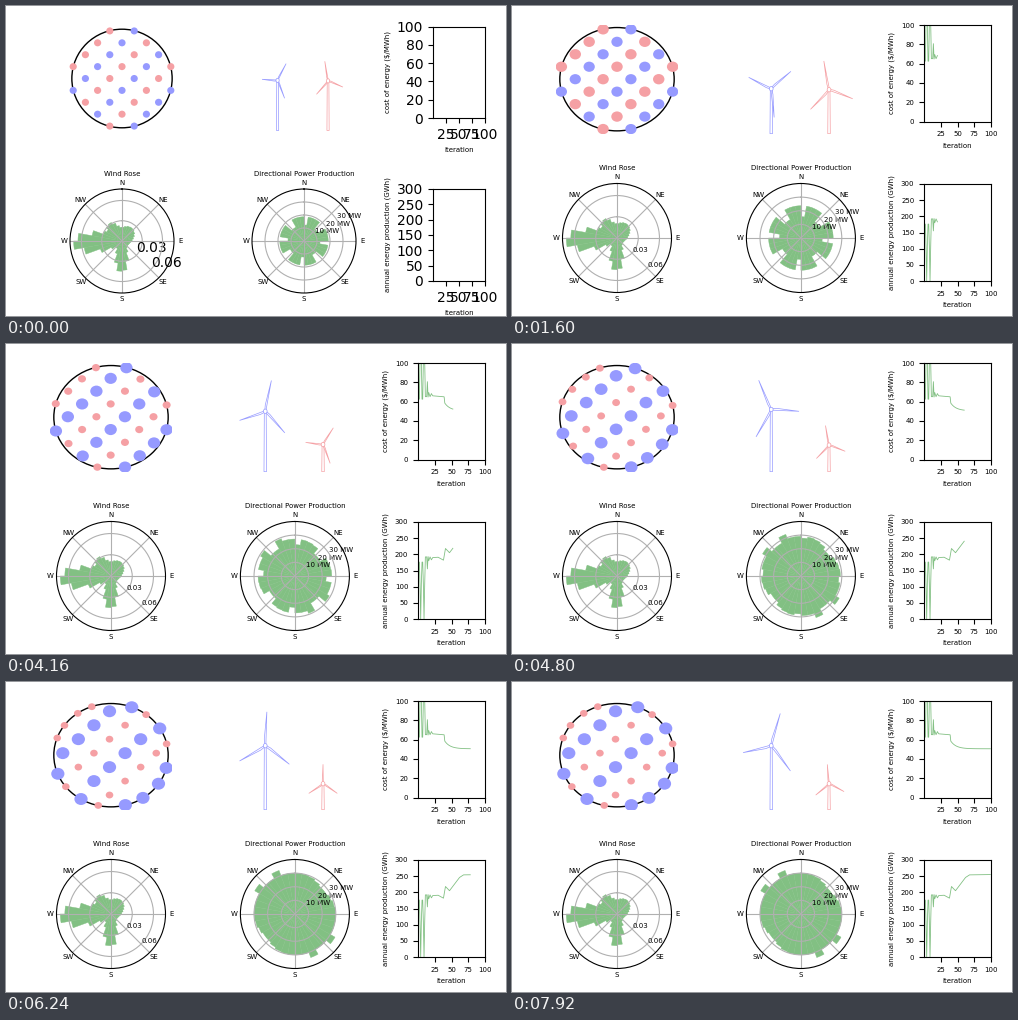
These frames come from a looping animation (500x310 px, 8000 ms). A matplotlib script:

```python
import numpy as np
import matplotlib.pyplot as plt
from matplotlib.animation import FuncAnimation
from matplotlib.patches import Circle, Polygon

W, H, FRAMES = 500, 310, 100
BLUE, RED, GREEN = "#969aff", "#f5a0a4", "#82c083"
STEPS = np.arange(FRAMES)
SECTORS = np.arange(0, 360, 10)
plt.rcParams["font.family"] = "DejaVu Sans"

# Axes boxes in pixels: left, top, width, height
FIRST = dict(farm=(62.5, 20.5, 107, 104), turbines=(244.7, 20.5, 106.6, 104),
             rose=(64, 183, 104, 104), power=(246, 183, 104, 104),
             cost=(427, 20.5, 52, 91.5), aep=(427, 183, 52, 92))
MAIN = dict(farm=(44, 18.7, 122, 109), turbines=(228.5, 18.7, 122, 109),
            rose=(50.5, 177.5, 109, 109), power=(234.4, 177.5, 109, 109),
            cost=(412, 19, 67, 96.5), aep=(412, 178, 67, 97))


def curve(*points):
    """Values for every iteration from (iteration, value) corners."""
    return np.interp(STEPS, *zip(*points))


def lobe(angle, centre, height, width):
    """Bell-shaped bump on the compass, all angles in degrees."""
    gap = (angle - centre + 180) % 360 - 180
    return height * np.exp(-0.5 * (gap / width) ** 2)


# Farm layout on a unit disc: a diagonal lattice with striped colours
def lattice():
    for row in range(9):
        for col in range(-4, 5):
            x, y = 0.244 * col, 0.242 * (4 - row)
            if (row + col) % 2 and np.hypot(x, y) < 1.05:
                yield x, y, "r" if (row + col) % 4 == 3 else "b"


def spread(x, y):
    """Outer turbines settle on the rim, inner ones fan out."""
    if np.hypot(x, y) < 0.8:
        return 1.12 * x - 0.026, 1.12 * y + 0.04
    angle = np.degrees(np.arctan2(x, y))
    push = 0
    for gap_centre in (0, 270):
        d = (angle - gap_centre + 180) % 360 - 180
        push += 10 * np.sign(d) * np.exp(-abs(d) / 35)
    turned = np.radians(angle + push)
    return np.sin(turned), np.cos(turned)


FARM = list(lattice())
GRID = np.array([(x, y) for x, y, _ in FARM])
SPREAD = np.array([spread(x, y) for x, y in GRID])
SPREADING = curve((38, 0), (41, 0.06), (52, 0.22), (68, 1))

# Wind frequency in thousandths, power in MW
middle = SECTORS + 5
WIND = (10 + lobe(middle, 267, 62, 16) + lobe(middle, 181, 36, 15)
        + lobe(middle, 322, 20, 17) + lobe(middle, 35, 14, 35))
in_line = abs((SECTORS + 22.5) % 45 - 22.5) <= 5
POWER_START = np.where(in_line, 16, 24.2)
POWER_END = (30 - lobe(SECTORS, 45, 3, 15) - lobe(SECTORS, 225, 3, 15)
             + 4 * np.isin(SECTORS % 180, (120, 150)))
POWER_MIX = curve((38, 0), (41, 0.45), (52, 0.5), (62, 0.93), (68, 1))

# Annual energy and its cost: wild search, plateau, then improvement
AEP = np.where(STEPS < 11, 185 * abs(np.sin(np.pi * (STEPS - 4) / 5)),
               curve((11, 192), (13, 192), (14, 155), (15, 193), (16, 180),
                     (18, 192), (20, 183), (22, 190), (30, 191), (38, 182),
                     (41, 218), (47, 205), (62, 246), (68, 254), (99, 255)))
COST = np.select(
    [STEPS < 11, STEPS < 22, STEPS < 40],
    [11000 / np.maximum(AEP, 20), 12500 / np.maximum(AEP, 20), 66 - 0.06 * (STEPS - 22)],
    50.5 + 7 * np.exp((41 - STEPS) / 8))

ROTOR = dict(b=curve((0, 21), (12, 29.2), (38, 28.3), (41, 30), (68, 33.9)),
             r=curve((0, 21), (12, 29.5), (38, 29), (41, 21.5), (68, 19.4)))
HUB = dict(b=curve((0, 52.5), (20, 45), (38, 41), (41, 58), (68, 64)),
           r=curve((0, 52), (20, 44), (38, 34), (41, 28), (68, 26)))
COLOURS = dict(b=BLUE, r=RED)

fig = plt.figure(figsize=(W / 100, H / 100), dpi=100, facecolor="white")
axes = {name: fig.add_axes([0.1, 0.1, 0.5, 0.5], label=name,
                           projection="polar" if name in ("rose", "power") else None)
        for name in MAIN}


def setup_polar(ax, title, rmax, ticks, labels, angle):
    ax.set_theta_zero_location("N")
    ax.set_theta_direction(-1)
    bars = ax.bar(np.radians(middle), np.ones(36), width=np.radians(10),
                  facecolor=GREEN, edgecolor=GREEN, lw=0.3)
    ax.set_ylim(0, rmax)
    ax.set_xticks(np.radians(np.arange(0, 360, 45)),
                  labels=["N", "NE", "E", "SE", "S", "SW", "W", "NW"])
    ax.set_yticks(ticks, labels=labels)
    ax.set_rlabel_position(angle)
    ax.tick_params(axis="x", pad=-6, labelsize=5)
    ax.tick_params(axis="y", labelsize=5)
    ax.set_title(title, fontsize=5, y=1.0, pad=9.7)
    return bars


def setup_history(ax, label, top, step):
    ax.set_xlim(0, 100)
    ax.set_ylim(0, top)
    ax.set_xticks([25, 50, 75, 100])
    ax.set_yticks(np.arange(0, top + 1, step))
    ax.set_xlabel("iteration", fontsize=5)
    ax.set_ylabel(label, fontsize=5)
    return ax.plot([], [], color=GREEN, lw=0.6)[0]


def set_heights(bars, values):
    for bar, value in zip(bars, values):
        bar.set_height(value)


class Turbine:
    BLADE = np.array([(0, 0.02), (0.2, 0.045), (1, 0), (0, -0.02)])

    def __init__(self, ax, kind, x, start, speed):
        self.kind, self.x, self.start, self.speed = kind, x, start, speed
        style = dict(facecolor="white", edgecolor=COLOURS[kind], lw=0.5)
        self.tower = ax.add_patch(Polygon(np.zeros((4, 2)), zorder=1, **style))
        self.blades = [ax.add_patch(Polygon(np.zeros((4, 2)), zorder=2, **style))
                       for _ in range(3)]
        self.hub = ax.add_patch(Circle((x, 0), 2.2, zorder=3, **style))

    def update(self, n):
        x, y, size = self.x, HUB[self.kind][n], ROTOR[self.kind][n]
        self.tower.set_xy([(x - 1.5, 0), (x - 1.1, y), (x + 1.1, y), (x + 1.5, 0)])
        self.hub.center = (x, y)
        for k, blade in enumerate(self.blades):
            a = np.radians(self.start + self.speed * n + 120 * k)
            turn = np.array([(np.cos(a), np.sin(a)), (-np.sin(a), np.cos(a))])
            blade.set_xy(size * self.BLADE @ turn + (x, y))


farm = axes["farm"]
farm.set_xlim(-1.07, 1.07)
farm.set_ylim(-1.058, 1.058)
farm.axis("off")
farm.add_patch(Circle((0, 0), 1.003, fill=False, edgecolor="black", lw=1))
markers = [farm.add_patch(Circle((x, y), 0.1, facecolor=COLOURS[kind], lw=0, zorder=2))
           for x, y, kind in FARM]

stage = axes["turbines"]
stage.set_xlim(-71.8, 71.8)
stage.set_ylim(0, 109)
stage.axis("off")
turbines = [Turbine(stage, "b", -35.6, 56.8, 5), Turbine(stage, "r", 32.4, 102, 6)]

rose_bars = setup_polar(axes["rose"], "Wind Rose", 77, [30, 60], ["0.03", "0.06"], 135)
set_heights(rose_bars, WIND)
power_bars = setup_polar(axes["power"], "Directional Power Production", 40,
                         [10, 20, 30], ["10 MW", "20 MW", "30 MW"], 56.5)
cost_line = setup_history(axes["cost"], "cost of energy (\\$/MWh)", 100, 20)
aep_line = setup_history(axes["aep"], "annual energy production (GWh)", 300, 50)


def arrange(boxes, size):
    for name, (x, y, w, h) in boxes.items():
        axes[name].set_position([x / W, 1 - (y + h) / H, w / W, h / H])
    for name in ("cost", "aep"):
        axes[name].tick_params(labelsize=size)
    axes["rose"].tick_params(axis="y", labelsize=size)


def update(n):
    # The roomy opening layout lasts a single step
    if n == 0:
        arrange(FIRST, 10)
    elif n == 1:
        arrange(MAIN, 5)

    spots = GRID + (SPREAD - GRID) * SPREADING[n]
    for marker, spot, (_, _, kind) in zip(markers, spots, FARM):
        marker.center = spot
        marker.set_radius(0.00342 * ROTOR[kind][n])

    for turbine in turbines:
        turbine.update(n)

    scale = min(AEP[n] / 187, 1) if n else 0.77
    set_heights(power_bars, scale * POWER_START
                + (POWER_END - POWER_START) * POWER_MIX[n])

    cost_line.set_data(STEPS[:n + 1], COST[:n + 1])
    aep_line.set_data(STEPS[:n + 1], AEP[:n + 1])
    return []


anim = FuncAnimation(fig, update, frames=FRAMES, init_func=lambda: update(0),
                     interval=80, repeat=True, repeat_delay=0, blit=False)
plt.show()
```
